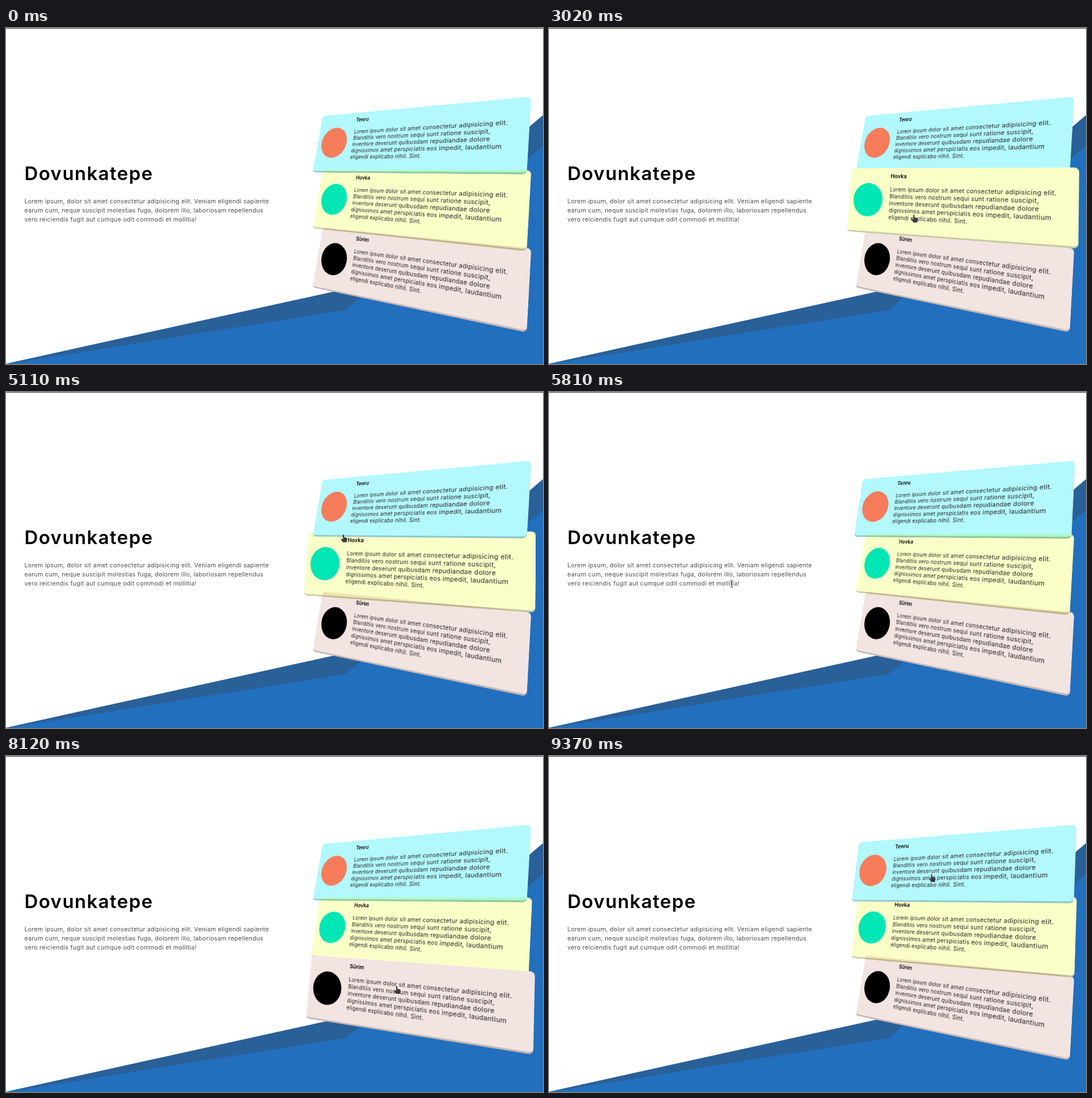
Write an HTML page that moves like this. It is 947 px wide and 592 px high and loops after 9.47 s.

```html
<!DOCTYPE html>
<html lang="tr">
<head>
<meta charset="utf-8">
<title>Tilted cards</title>
<style>
  html, body { margin: 0; width: 100%; height: 100%; overflow: hidden; background: #fff; }
  body { position: relative; font-family: Inter, "Open Sans", sans-serif; }
  svg, .deck, .card, .card *, h1, .intro { position: absolute; margin: 0; white-space: pre; }
  svg, .deck { left: 0; top: 0; width: 947px; height: 592px; }
  .deck { isolation: isolate; }
  h1 { left: 32.5px; top: 236px; font-size: 33px; line-height: 40px; font-weight: 600; letter-spacing: 1.4px; color: #000; }
  .intro { left: 32.5px; top: 297.7px; font-size: 10.67px; line-height: 16px; letter-spacing: .025em; color: #4c4c4c; }
  .card {
    left: 0; top: 0; width: 413px; height: 124px; box-sizing: border-box;
    border-bottom: 3.6px solid rgba(0, 0, 0, .2); border-radius: 7px;
    transform-origin: 0 0; mix-blend-mode: multiply;
  }
  .card.over { z-index: 1; mix-blend-mode: normal; }
  .card i { left: 10px; top: 29px; width: 64px; height: 64px; border-radius: 50%; }
  .card h2 { left: 88.5px; top: 9px; font-size: 10.8px; line-height: 14px; font-weight: 600; color: #000; }
  .card p { left: 88.5px; top: 34px; font-size: 10.67px; line-height: 13.1px; letter-spacing: .025em; color: #222; }
  #cursor { z-index: 2; }
</style>
</head>
<body>
<svg viewBox="0 0 947 592">
  <path fill="#2a6098" d="M0 591.4L582 463.4 947 153.6V592H0Z"/>
  <path fill="#226fbe" d="M0 592L599 497 947 208V592Z"/>
  <path fill="#333" d="M0 0H947V1H0Z"/>
</svg>
<h1>Dovunkatepe</h1>
<p class="intro">Lorem ipsum, dolor sit amet consectetur adipisicing elit. Veniam eligendi sapiente
earum cum, neque suscipit molestias fuga, dolorem illo, laboriosam repellendus
vero reiciendis fugit aut cumque odit commodi et mollitia!</p>
<div class="deck"></div>
<svg id="cursor" viewBox="0 0 947 592">
  <g id="pointer">
    <path data-kind="hand" fill="#3a3a3c" d="M-2.4-6.2Q-1.3-7.6-.4-6.2L.2-2 4.6-.8Q6-.3 5.7 1.8L4.6 7H-2L-5.5 1.6Q-5 .1-3.4 .9L-1.6 2Z"/>
    <path data-kind="arrow" fill="#333" stroke="#fff" stroke-width=".6" d="M-4-7V5L-1.3 2.6.6 7 2.5 6.2.6 2H4.5Z"/>
    <path data-kind="beam" fill="none" stroke="#333" d="M-2.5-6Q0-6 0-5 0-6 2.5-6M0-5V5M-2.5 6Q0 6 0 5 0 6 2.5 6"/>
  </g>
</svg>
<script>
const LOOP = 9470, LAST = 9370, FADE = 400, W = 413, H = 124;
const TEXT = `Lorem ipsum dolor sit amet consectetur adipisicing elit.
Blanditiis vero nostrum sequi sunt ratione suscipit,
inventore deserunt quibusdam repudiandae dolore
dignissimos amet perspiciatis eos impedit, laudantium
eligendi explicabo nihil. Sint.`;

const cards = [
  { name: 'Tenru', color: '#b2f8fc', icon: '#f67c5c' },
  { name: 'Hovka', color: '#faffc8', icon: '#00e6b4' },
  { name: 'Sürim', color: '#f2e4e1', icon: '#000' }
];

// Corners of the top card, clockwise from top left; the others hang below it.
const REST = { x: [558.5, 926.5, 918.5, 541], y: [155, 121, 258, 254.5], pitch: 92.75 };
const OVER = { x: [533, 935, 933.5, 525.5], y: [148.5, 121, 261.5, 258], pitch: 95.8 };

// Time and place of each turn of the cursor.
const route = [
  [1050, 643, 219], [1830, 649, 222], [1990, 655, 249], [2300, 662, 305], [2780, 662, 305],
  [3640, 600, 415], [3910, 600, 415], [4070, 605, 402], [4400, 620, 288], [4910, 620, 288],
  [5330, 570, 225], [5600, 533, 250], [5810, 323, 338], [6150, 45, 365], [6450, 190, 398],
  [6780, 533, 350], [7170, 681, 341], [7430, 681, 341], [7610, 690, 190], [8030, 690, 412],
  [8660, 690, 412], [8800, 692, 327], [9260, 682, 259], [9370, 676, 215]
];

const mix = (a, b, p) => a + (b - a) * p;
const mixAll = (a, b, p) => a.map((v, k) => mix(v, b[k], p));
const clamp = v => Math.min(1, Math.max(0, v));

// cubic-bezier(.25, .1, .25, 1)
function ease(x) {
  if (x <= 0 || x >= 1) return clamp(x);
  const curve = (a, b, s) => 3 * a * s * (1 - s) ** 2 + 3 * b * s * s * (1 - s) + s ** 3;
  let lo = 0, hi = 1;
  for (let i = 0; i < 24; i++) {
    const mid = (lo + hi) / 2;
    if (curve(.25, .25, mid) < x) lo = mid; else hi = mid;
  }
  return curve(.1, 1, lo);
}

function cursorAt(t) {
  let i = 0;
  while (i < route.length - 2 && route[i + 1][0] <= t) i++;
  const [from, ...a] = route[i], [to, ...b] = route[i + 1];
  return mixAll(a, b, clamp((t - from) / (to - from)));
}

// Index of the card under the fingertip, -1 for none.
function cardUnder(t) {
  const [x, y] = cursorAt(t), tip = y - 7;
  if (t < route[0][0] || x < 533) return -1;
  return tip > 357 ? 2 : tip > 252 ? 1 : 0;
}

// Every change of the hovered card during the loop.
const hovers = [];
for (let t = 0, last = -1; t <= LAST; t += 10) {
  const id = cardUnder(t);
  if (id !== last) hovers.push({ time: t, id });
  last = id;
}

// Eased hover amount, each change starting from the value reached so far.
function hoverAmount(card, t) {
  let from = 0, to = 0, start = -FADE;
  const value = now => mix(from, to, ease((now - start) / FADE));
  for (const { time, id } of hovers) {
    if (time > t) break;
    const goal = id === card ? 1 : 0;
    if (goal !== to) {
      from = value(time);
      to = goal;
      start = time;
    }
  }
  return value(t);
}

// Maps a flat card onto the quad, then moves it down to its row.
function project(row, p) {
  const [x0, x1, x2, x3] = mixAll(REST.x, OVER.x, p);
  const [y0, y1, y2, y3] = mixAll(REST.y, OVER.y, p);
  const drop = row * (mix(REST.pitch, OVER.pitch, p) + 2.75 * row);
  const dx1 = x1 - x2, dy1 = y1 - y2, dx2 = x3 - x2, dy2 = y3 - y2;
  const sx = x0 - x1 + x2 - x3, sy = y0 - y1 + y2 - y3;
  const det = dx1 * dy2 - dx2 * dy1;
  const g = (sx * dy2 - dx2 * sy) / det, h = (dx1 * sy - sx * dy1) / det;
  const m = [
    (x1 - x0 + g * x1) / W, (y1 - y0 + g * y1 - 1.2 * row) / W, 0, g / W,
    (x3 - x0 + h * x3) / H, (y3 - y0 + h * y3) / H, 0, h / H,
    0, 0, 1, 0, x0, y0 + drop, 0, 1];
  return `matrix3d(${m.map(v => v.toFixed(9))})`;
}

function cursorKind(t, x, y) {
  if (t < route[0][0]) return '';
  if (cardUnder(t) >= 0) return 'hand';
  const onText = x > 33 && ((x < 465 && y > 297 && y < 345) || (x < 261 && y > 236 && y < 276));
  return onText ? 'beam' : 'arrow';
}

function add(parent, tag, text = '') {
  const el = document.createElement(tag);
  el.textContent = text;
  return parent.appendChild(el);
}

const deck = document.querySelector('.deck');
const pointer = document.getElementById('pointer');
for (const card of cards) {
  card.el = add(deck, 'div');
  card.el.className = 'card';
  card.el.style.backgroundColor = card.color;
  add(card.el, 'i').style.background = card.icon;
  add(card.el, 'h2', card.name);
  add(card.el, 'p', TEXT);
}

function draw(t) {
  const hovered = cardUnder(t);
  cards.forEach(({ el }, i) => {
    el.style.transform = project(i, hoverAmount(i, t));
    el.classList.toggle('over', i === hovered);
  });
  const [x, y] = cursorAt(t), kind = cursorKind(t, x, y);
  pointer.setAttribute('transform', `translate(${x} ${y})`);
  for (const shape of pointer.children) {
    shape.style.display = shape.dataset.kind === kind ? '' : 'none';
  }
}

const begin = performance.now();
function tick() {
  draw(Math.min((performance.now() - begin) % LOOP, LAST));
  requestAnimationFrame(tick);
}
tick();
</script>
</body>
</html>
```
